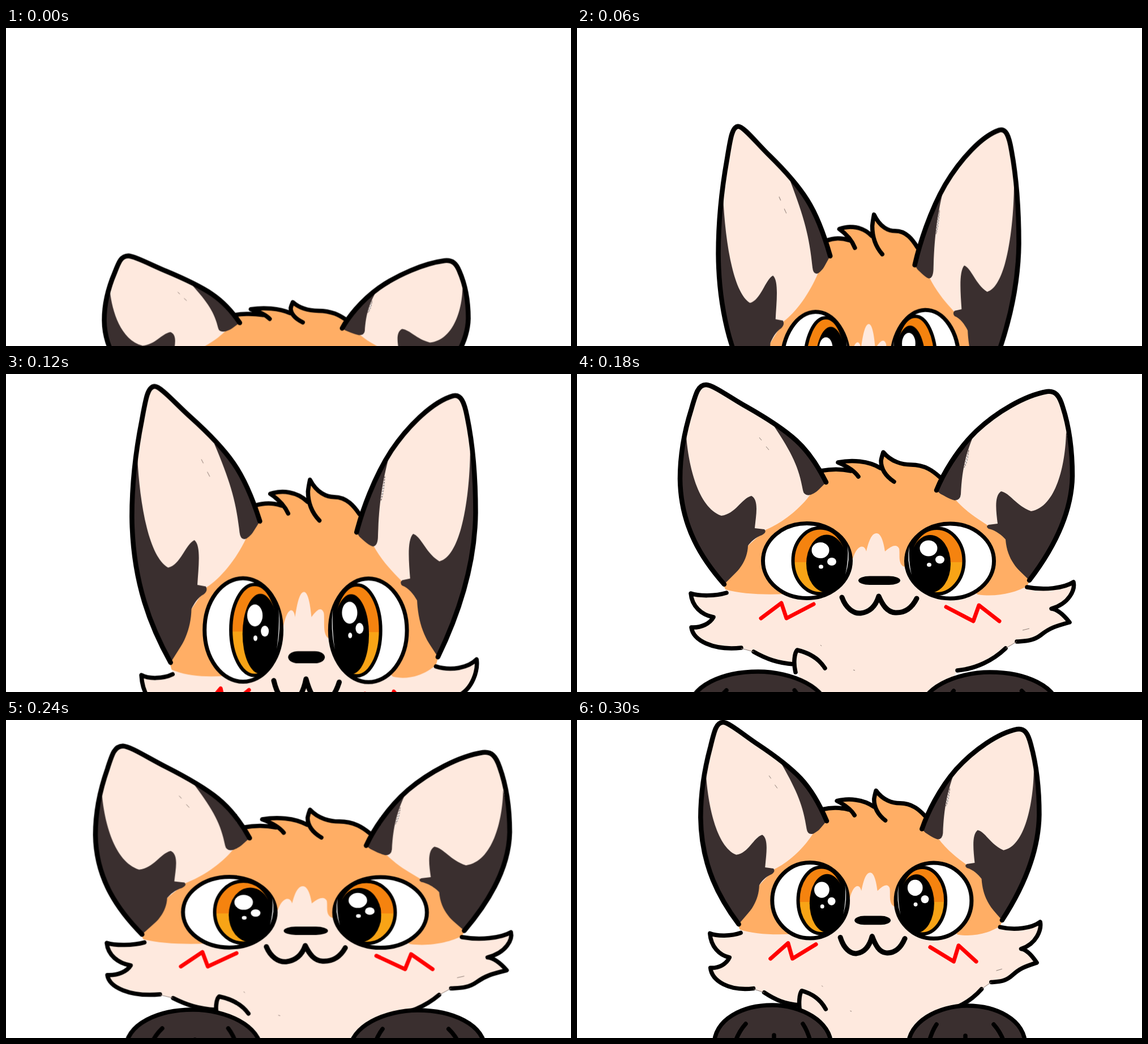
An HTML page without scripts for the animation above (0.36 s loop, 998 by 561 pixels).

```html
<!DOCTYPE html>
<html lang="en">
<head>
<meta charset="utf-8">
<title>Fox pop-up</title>
<style>
  html, body { margin: 0; width: 100%; height: 100%; overflow: hidden; background: #fff; }
  svg { display: block; width: 100vw; height: 100vh; }
  path, ellipse { vector-effect: non-scaling-stroke; }
  .cream { fill: #fee9de; }
  .orange { fill: #ffae65; }
  .dark { fill: #3a2f2f; }
  .line { fill: none; stroke: #000; stroke-width: 7.5; stroke-linecap: round; stroke-linejoin: round; }
  .ear { stroke-width: 8.5; }
  .mouth { stroke-width: 9; }
  .blush { stroke: #f00; stroke-width: 7; }
  .speck { fill: none; stroke: #8d7c75; stroke-width: 1; }
  #head, #paws { transform-origin: 0 0; animation: head 360ms step-end infinite; }
  #paws { animation-name: paws; }

  /* squash and stretch: matrix(scaleX, skewY, 0, scaleY, x, y) */
  @keyframes head {
    0%     { transform: matrix(.928, 0, 0, .685, 4.5, 389.2); }
    16.66% { transform: matrix(.766, -.016, 0, 1.35, 110.2, 151.5); }
    33.33% { transform: matrix(.876, 0, 0, 1.384, 63, -4.5); }
    50%    { transform: none; }
    66.66% { transform: matrix(1.056, 0, 0, .944, -34.3, 28); }
    83.33%, 100% { transform: matrix(.863, 0, 0, 1.012, 61.3, -15.2); }
  }
  @keyframes paws {
    0%     { transform: translateY(300px); }
    50%    { transform: matrix(1.191, 0, 0, 1, -91, 22); }
    66.66% { transform: matrix(1.155, 0, 0, 1, -68.3, 8); }
    83.33%, 100% { transform: none; }
  }
</style>
</head>
<body>
<svg viewBox="0 0 998 561" preserveAspectRatio="none">
  <defs>
    <linearGradient id="iris" x2="0" y2="1">
      <stop offset=".52" stop-color="#f5830f"/>
      <stop offset=".52" stop-color="#f8a416"/>
    </linearGradient>
    <g id="eye">
      <ellipse cx="406" cy="329.5" rx="77.5" ry="66" fill="#fff" stroke="#000" stroke-width="7"/>
      <ellipse cx="429.5" cy="329.5" rx="48" ry="58" fill="url(#iris)" stroke="#000" stroke-width="6"/>
      <ellipse cx="441" cy="334.5" rx="36" ry="51"/>
      <path d="M478 303Q483 328 474 354Q480 328 478 303Z" fill="#fff"/>
    </g>
    <g id="shine" fill="#fff">
      <ellipse rx="15.5" ry="14"/>
      <ellipse cx="20" cy="20" rx="8" ry="7"/>
      <ellipse cx="1" cy="29" rx="4" ry="3.5"/>
    </g>
    <g id="paw">
      <path class="line" style="fill:#3a2f2f" d="M242 575C242 526 295 503 345 503S449 531 449 575"/>
      <path class="line" d="M298 536Q287 548 280 566M399 536Q407 548 412 566M348 556V570"/>
    </g>
    <path id="earL" d="M260 371C222 328 183 270 182 185C182 138 190 100 202 62C210 34 214 19 228 19C240 19 270 41 300 58S365 97 387 117S427 165 440 191"/>
    <path id="earR" d="M635 205C646 178 670 135 705 101C740 68 790 38 830 31C845 29 852 38 858 58C870 95 875 140 875 180C874 240 848 300 799 364"/>
    <clipPath id="inL"><use href="#earL"/></clipPath>
    <clipPath id="inR"><use href="#earR"/></clipPath>
  </defs>

  <g id="head">
    <!-- face and ear fills -->
    <path class="cream" d="M262 372L264 386C245 392 215 392 201 387C203 410 220 425 241 429C235 440 220 448 202 447C205 470 240 488 290 483L312 490C335 503 355 510 383 512L440 640H605L672 523C705 520 735 505 757 484L777 472C805 472 820 455 870 438C862 428 850 415 838 414C870 405 880 380 877 367C860 378 825 382 795 376L800 362L640 240H420Z"/>
    <use href="#earL" class="cream"/>
    <use href="#earR" class="cream"/>
    <path class="orange" d="M258 371L302 303L333 275C360 264 392 240 412 213L440 191L430 171C450 167 470 168 484 171L461 156C485 151 515 153 535 166C537 150 539 142 541 138C555 155 575 160 590 160C615 160 630 172 641 182L635 205L668 221C700 258 740 270 757 292L800 364L795 374C775 386 740 394 708 389L650 350L578 340C566 335 571 318 569 308Q563 296 544 313C542 300 538 281 529 281S515 296 511 313C508 300 495 300 487 326L370 388C330 390 290 388 262 380Z"/>

    <!-- dark ear markings -->
    <g class="dark" clip-path="url(#inL)">
      <path d="M193 110C197 160 213 235 255 250C280 247 290 220 308 215C322 222 316 250 314 272L331 274Q336 279 327 284C315 288 307 296 302 303C301 330 285 350 258 373L150 300Z"/>
      <path d="M348 92C380 140 392 165 399 205Q401 216 413 213C425 208 433 199 445 192L420 120Z"/>
    </g>
    <g class="dark" clip-path="url(#inR)">
      <path d="M864 102C863 160 846 235 802 242C775 232 765 210 749 207C737 215 740 240 743 264L727 266Q721 269 727 273C740 276 750 284 757 292C760 330 780 346 800 366L910 300Z"/>
      <path d="M705 98C686 140 680 170 678 212Q677 223 667 223C655 220 645 212 631 206L640 120Z"/>
    </g>
    <path d="M692 134Q688 148 684 165Q690 156 692 134Z" fill="#fff" stroke="#3a2f2f" stroke-width=".7" stroke-dasharray="3 2"/>

    <!-- outlines: hair, ears, cheeks -->
    <path class="line" d="M430 171C450 167 470 168 484 171M497 181C490 171 478 163 461 156C485 151 515 153 536 166M560 190C545 180 537 167 537 153Q538 147 541 138C555 155 575 160 590 160C615 160 630 172 641 182"/>
    <use href="#earL" class="line ear"/>
    <use href="#earR" class="line ear"/>
    <path class="line" d="M264 386C245 392 215 392 201 387C203 410 220 425 241 429C235 440 220 448 202 447C205 470 240 488 290 483M312 490C335 503 355 510 383 512M386 526C382 510 384 492 389 487C410 492 428 503 438 519"/>
    <path class="line" d="M795 376C825 382 860 378 877 367C880 380 870 405 838 414C850 415 862 428 870 438C845 445 835 448 820 460C805 472 790 471 777 472M757 484C735 505 705 520 672 523"/>
    <path class="speck" d="M290 484L312 490M757 484L777 472M787 452L799 449M322 112L326 117M334 128L339 134M430 478L432 480M488 522L491 523"/>

    <use href="#eye"/>
    <use href="#eye" transform="matrix(-1 0 0 1 1065 .5)"/>
    <use href="#shine" x="430" y="311"/>
    <use href="#shine" x="621" y="307.5"/>

    <rect x="497" y="356.5" width="74" height="15.5" rx="20" ry="7.75"/>
    <path class="line mouth" d="M468 394C475 413 488 423 501 422C518 420 528 408 533 392C540 408 548 420 562 421C580 422 592 412 600 396"/>
    <path class="line blush" d="M325 431L361 404L370 431L418 406M652 411L700 436L710 408L746 436"/>
  </g>

  <g id="paws">
    <use href="#paw"/>
    <use href="#paw" transform="matrix(-1 0 0 1 1034 1)"/>
  </g>
</svg>
</body>
</html>
```
